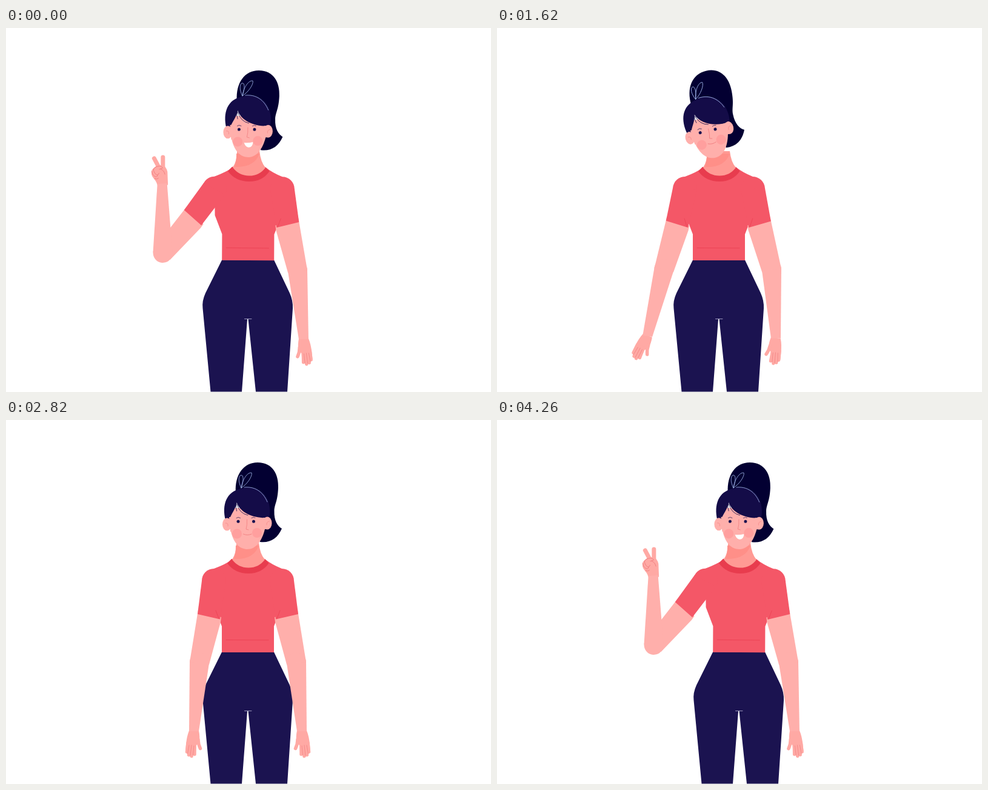
These frames come from a looping animation (800x600 px, 4290 ms). An HTML page with a canvas:

```html
<!DOCTYPE html>
<html lang="en">
<head>
<meta charset="utf-8">
<title>Peace sign</title>
<style>
html, body { margin: 0; width: 100%; height: 100%; overflow: hidden; background: #fff; }
canvas { display: block; }
</style>
</head>
<body>
<canvas id="stage" width="800" height="600"></canvas>
<script>
const ctx = document.getElementById('stage').getContext('2d');
const LOOP = 4290, STEP = 30, GONE = 960, ENTER = 1290;
const SKIN = '#ffafab', HAND = '#ffa9a4', LINE = '#f07f80', SHIRT = '#f45767',
  TRIM = '#e83c4e', NAVY = '#1b1350', HAIR = '#140c48', BUN = '#030032', BAND = '#a9c1f2';
const HIP = [399, 420], NECK = [399, 235];

// time, slide, torso angle, head angle
const BODY = [
  [1290, -475, -10, -12], [1350, -390, -9.5, -14], [1620, -33, 0, -13], [1770, 30, 4, -2],
  [1890, 25, 4, 6], [2100, 4, 0, 3], [2340, 0, -4.3, -3.6], [2430, 0, -3.8, -6],
  [2640, 0, -.5, -1], [2820, 0, 0, 0], [3200, 0, 0, 0], [3600, 0, 1.2, 3.6],
  [3975, 0, -1.6, -7], [4260, 0, .3, .4], [4350, 0, .5, 1], [4740, 0, -.8, -1.5],
  [5130, 0, .3, .6], [5220, 0, .2, .4]
];
// time, upper arm, forearm and hand angles
const RIGHT = [
  [1290, -5, 15, 46], [1350, -5, 15, 45], [1620, -3, 1, 11], [1800, -1, -3, -2],
  [1920, 0, -3, -5], [2340, -2, 0, 0], [2820, 0, 0, 0], [3200, 0, 0, 0],
  [3600, 1.5, 1, 2], [3975, -4, -5, -6], [4260, -.5, -.5, -1], [4350, 0, 0, 0],
  [4740, -2.5, -2.5, -3], [5130, 0, 0, 0], [5220, -.3, -.3, -.5]
];
const LEFT = [
  [1290, 10, 25, 50], [1350, 10, 24, 48], [1620, 4.5, 9.3, 21], [1800, 2, 4, 5],
  [1950, -1, -1, -4], [2340, 0, 9, 6], [2400, 0, 9, 8], [2820, 0, 0, 0],
  [3150, 0, 0, 0], [3300, 10, 35, 20], [3400, 22, 88, 62], [3500, 29, 148, 135],
  [3600, 30.7, 178.5, 183], [4050, 27, 170, 160], [4260, 28.6, 175, 167],
  [4420, 29, 178, 175], [4800, 28, 173, 163], [5190, 28.6, 176, 169], [5220, 28.6, 176, 169]
];

const rad = d => d * Math.PI / 180;
const clamp = (v, lo, hi) => Math.min(hi, Math.max(lo, v));

// Hermite curve through the keys, flat at turning points
function sample(keys, t, c) {
  const last = keys.length - 1;
  if (t >= keys[last][0]) return keys[last][c];
  let i = 0;
  while (t >= keys[i + 1][0]) i++;
  const slope = k => (keys[k + 1][c] - keys[k][c]) / (keys[k + 1][0] - keys[k][0]);
  const tangent = k => {
    if (k === 0) return slope(0);
    if (k === last) return 0;
    const a = slope(k - 1), b = slope(k);
    return a * b <= 0 ? 0 : 2 * a * b / (a + b);
  };
  const [a, b] = [keys[i], keys[i + 1]], d = b[0] - a[0], u = (t - a[0]) / d;
  const u2 = u * u, u3 = u2 * u, s = 3 * u2 - 2 * u3;
  return a[c] + (b[c] - a[c]) * s + d * ((u3 - 2 * u2 + u) * tangent(i) + (u3 - u2) * tangent(i + 1));
}
const pose = (keys, t) => [1, 2, 3].map(c => sample(keys, t, c));

function turn([x, y], [px, py], deg) {
  const c = Math.cos(rad(deg)), s = Math.sin(rad(deg));
  x -= px; y -= py;
  return [px + x * c - y * s, py + x * s + y * c];
}
function fill(d, color) {
  ctx.fillStyle = color;
  ctx.fill(new Path2D(d));
}
function line(d, color, w = .8) {
  ctx.strokeStyle = color;
  ctx.lineWidth = w;
  ctx.lineCap = ctx.lineJoin = 'round';
  ctx.stroke(new Path2D(d));
}
function oval(x, y, rx, ry, color) {
  ctx.fillStyle = color;
  ctx.beginPath();
  ctx.ellipse(x, y, rx, ry, 0, 0, 7);
  ctx.fill();
}
function group(draw) {
  ctx.save();
  draw();
  ctx.restore();
}
function spin([x, y], deg) {
  ctx.translate(x, y);
  ctx.rotate(rad(deg));
  ctx.translate(-x, -y);
}

function pants(torso) {
  const a = turn([356, 382.5], HIP, torso), b = turn([442, 382.5], HIP, torso);
  fill(`M${a} L329 437 Q323 450 324.500 462 L337.500 599.500 H389 L398 480 H399.500
    L412 599.500 H464 L473 462 Q473.500 449 468 437 L${b} Z`, NAVY);
  line('M393.500 479.500 H405', '#b9b6d6');
}

function shirt() {
  fill(`M373 230 Q362 238 343 245 L344 309 L356 340 V383 H442 V340 L454 309
    L455 245 Q438 238 428 230 Z`, SHIRT);
  line('M363 362.500 L433 362.800', TRIM, .7);
}

function collar() {
  fill('M372 229 L365 236 Q377 253 400 253 Q422 253 433.500 236 L427 229 Z', TRIM);
  fill('M380 203 Q380 219 373 230 Q383 243.500 400 243.500 Q417 243.500 427 230 Q419 221 417 203 Z', '#ff9a94');
  fill('M379 207 H417 Q408 231 376 229 Q379 222 379 207 Z', '#ff8f88');
}

function openHand() {
  fill('M-8 0 L8 0 Q12 10 13 23 L14 34 L-3 36 L-4 24 L-9 20 Q-10 9 -8 0 Z', HAND);
  line('M-7 15 Q-7 22 -10.500 29.500', HAND, 5.5);
  line('M-1 22 L-1 39 M3 22 L4 42 M7 22 L8.500 40 M10 20 L11.500 35', HAND, 5.5);
  line('M0 25 L1.500 40 M4 24 L6 41 M8 24 L10.500 38', LINE, .7);
}

function peaceHand(h) {
  const tilt = clamp(.75 * h + 8.75, -8, 12);
  const finger = (x, y, a) => group(() => {
    ctx.translate(x, y);
    ctx.rotate(rad(a));
    line('M0 4 V-16', HAND, 7);
  });
  finger(.7, -29, tilt - 14);
  finger(7.5, -27.500, tilt + 14);
  fill('M-8 3 Q-8 -6 -11 -11 Q-16 -20 -11 -27 Q-5 -32 7 -31 Q13 -28 13 -18 Q11 -8 9 3 Z', HAND);
  line('M-4 -30 Q-11 -29 -8 -21 Q-5 -13 -1 -19 M-12 -25 Q-13 -17 -7 -14 Q-4 -14 -4 -17', LINE, .9);
  line('M-5 -30 Q5 -32 7 -26 L1 -25 M3 -25 Q8 -22 8 -15 M-10 -12 Q-7 -9 -4 -11', LINE, .9);
}

// drawn as the left arm; side -1 mirrors it
function arm(shoulder, side, [upper, fore, hand]) {
  group(() => {
    ctx.translate(...shoulder);
    ctx.scale(side, 1);
    ctx.rotate(rad(side * upper));
    fill('M-26 48 L12 60 L11 68 L-8 138 L-24 140 L-40 134 Z', SKIN);
    group(() => {
      ctx.translate(-24, 134);
      ctx.rotate(rad(side * (fore - upper)));
      oval(0, 0, 16, 16, SKIN);
      group(() => {
        ctx.translate(-9, 113);
        ctx.rotate(rad(side * (hand - fore)));
        if (hand > 75) {
          ctx.rotate(Math.PI);
          peaceHand(hand - 180);
        } else {
          ctx.scale(-1, 1);
          openHand();
        }
      });
      fill('M-16 0 L16 2 L-1 114 L-17 114 Z', SKIN);
    });
    oval(0, 0, 20, 20, SHIRT);
    fill('M-20 0 L-27 55 L10 63.500 L20 0 Z', SHIRT);
    if (upper < 15) line('M8 62 L3 49', TRIM, .6);
  });
}

function bun() {
  fill(`M379 120 C377 90 392 70 415 70 C440 70 450 90 449 112 C448 135 443 138 442.500 150
    C442 166 448 175 455 179 C448 195 436 203 419 201 L412 150 Z`, BUN);
}

function face(smile, eye) {
  fill(`M368 145 L370 180 C375 205 387 213 398 213 C412 213 422 200 427 180 L434 145 Z`, SKIN);
  fill(`M362 165 C356 140 363 118 388 113 C410 106 427 118 433 135 C436 146 436 154 434 161
    C410 163 387 154 380.500 136 C379 147 371 155 368.500 164 Z`, HAIR);
  oval(364.500, 172, 7.5, 10.500, SKIN);
  oval(431, 170, 7.5, 10.500, SKIN);
  fill('M368 160 H374 V184 H370 Z M424 161 H430 V180 H424 Z', SKIN);
  line('M362 170 Q367 169 366 175 M434 167 Q429 168 430 173', LINE, .6);
  oval(381, 187.500, 8, 8, '#ff9f9e');
  oval(414, 186, 8, 8, '#ff9f9e');
  line('M380 138 Q378 144 380.500 150 M381 139 Q385 154 399 157', HAIR, .8);
  line('M393 111 C410 109 424 118 431 135', BAND);
  line('M388 112 C382 100 384 91 388 91 C393 91 391 104 388 112 C390 98 398 86 405 87 C407 92 398 106 388 112', BAND);
  for (const x of [383, 408.500]) oval(x, 167.300, 2.5, 2.5 * eye, NAVY);
  line('M380 161.500 Q383 159 386.500 161.500 M405 161.500 Q408 159.500 411 161', NAVY, .7);
  line('M397.500 164 Q398 173 396 180 L400 181', LINE, .8);
  if (smile < .05) {
    line('M391.500 188 Q398 191 405 188', LINE, .9);
  } else {
    const dip = 188.500 + 11 * smile;
    fill(`M391.500 189 Q398 190 406 188 C406 ${dip} 394 ${dip} 391.500 189 Z`, '#fff');
  }
}

function draw(t) {
  ctx.fillStyle = '#fff';
  ctx.fillRect(0, 0, 800, 600);
  if (t >= GONE && t < ENTER) return;
  if (t < GONE) t += LOOP - STEP;

  const [slide, torso, head] = pose(BODY, t);
  const smile = clamp((t - 3330) / 180, 0, 1);
  const eye = clamp(Math.abs(t - 3600) / 90, .3, 1);
  const neck = turn(NECK, HIP, torso);
  const onHead = part => group(() => {
    ctx.translate(neck[0] - NECK[0], neck[1] - NECK[1]);
    spin(NECK, head);
    part();
  });
  const onTorso = part => group(() => {
    spin(HIP, torso);
    part();
  });

  group(() => {
    ctx.translate(slide, 0);
    onHead(bun);
    pants(torso);
    onTorso(shirt);
    arm(turn([343, 265], HIP, torso), 1, pose(LEFT, t));
    arm(turn([455, 265], HIP, torso), -1, pose(RIGHT, t));
    onTorso(collar);
    onHead(() => face(smile, eye));
  });
}

const start = performance.now();
function tick() {
  const t = (performance.now() - start) % LOOP;
  draw(Math.floor(t / STEP) * STEP);
  requestAnimationFrame(tick);
}
tick();
</script>
</body>
</html>
```
